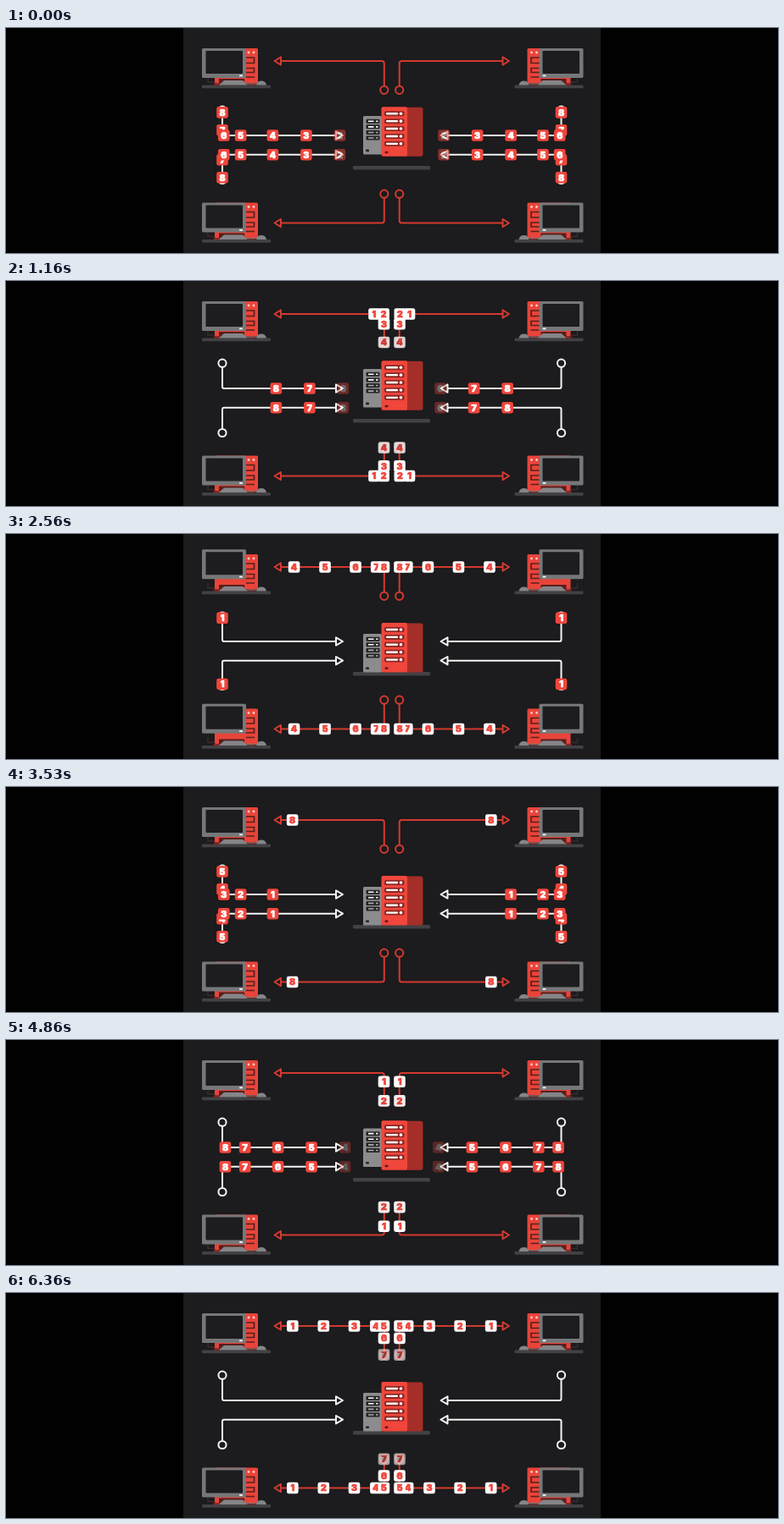
Animation of 910 by 266 pixels, one loop 6.5 s. Source, as an HTML page:

```html
<!DOCTYPE html>
<html lang="en">
<head>
<meta charset="utf-8">
<title>Client and server packets</title>
<style>
  html, body { margin: 0; width: 100%; height: 100%; overflow: hidden; background: #010102; }
  svg { display: block; width: 910px; height: 266px; }
  .packet text {
    font: 900 10.5px Inter, Roboto, "Liberation Sans", sans-serif;
    text-anchor: middle; stroke-width: .7; stroke-linejoin: round;
  }
  .request rect { fill: #f0463c; }
  .request text { fill: #fff; stroke: #fff; }
  .reply rect { fill: #fff; }
  .reply text { fill: #f0463c; stroke: #f0463c; }
  .wire { fill: none; stroke-width: 2; stroke-linejoin: round; }
</style>
</head>
<body>
<svg viewBox="0 0 910 266">
  <defs>
    <g id="tower">
      <rect x="231" y="67.5" width="81" height="3.8" rx="1" fill="#424144"/>
      <path d="M238 58v6h8" fill="none" stroke="#3c2a2b" stroke-width="1.5"/>
      <rect x="246" y="24" width="51" height="41.5" rx="1.5" fill="#e9443a"/>
      <path d="M245 65.5h8v2h-8zM285 65.5h9v2h-9z" fill="#8f2722"/>
      <circle cx="286" cy="29" r="1.4" fill="#ffc9c2"/>
      <circle cx="292" cy="29" r="1.4" fill="#ffc9c2"/>
      <path d="M280 35h12.5v6.5H280M280 47.5h12.5v5H280M283 58h10" fill="none" stroke="#56201e" stroke-width="1.7"/>
      <path d="M251 60h30v5.5h-30z" fill="#56201e"/>
      <path d="M251 67.5l6-5.5h22l6 5.5z" fill="#858588"/>
      <path d="M282 66h15" stroke="#777" fill="none"/>
      <path d="M295 67.5q1-5 6-5t6 5z" fill="#858588"/>
    </g>
    <g id="screen">
      <rect x="231" y="24" width="52" height="35" rx="1.5" fill="#767779"/>
      <rect x="235.5" y="27" width="43.5" height="27" rx="1" fill="#1d1c1f"/>
      <rect x="275" y="55.5" width="4" height="1.8" rx=".9" fill="#fff"/>
    </g>
  </defs>
  <rect x="209" width="492" height="266" fill="#1c1b1d"/>
  <g id="computers"></g>
  <g id="wires"></g>
  <rect x="409" y="163" width="91" height="4.5" rx="1.5" fill="#424144"/>
  <g id="small"></g>
  <g id="big"></g>
  <g id="packets"></g>
</svg>
<script>
const LOOP = 6500, CYCLE = 17, COUNT = 8, MIRROR_X = 909.5;
// Key points of the pace: ms, beats; one packet leaves per beat
const PACE = [[0, 0], [1160, 4.1], [4200, 16.8], [5460, 21.3], [6360, 24]];
const CORNERS = [[0, 0], [1, 0], [0, 1], [1, 1]];

const $ = id => document.getElementById(id);
const clamp = (v, a = 0, b = 1) => Math.min(b, Math.max(a, v));
const mod = (a, n) => ((a % n) + n) % n;
const easeInOut = p => (1 - Math.cos(Math.PI * clamp(p))) / 2;

function beatAt(time) {
  const t = Math.min(time, PACE[PACE.length - 1][0]);
  const i = PACE.findIndex(p => p[0] >= t) || 1;
  const [t0, b0] = PACE[i - 1], [t1, b1] = PACE[i];
  return mod(b0 + (b1 - b0) * (t - t0) / (t1 - t0), CYCLE);
}

// Distance covered when speed rises evenly over `ramp` beats, then stays
const speedUp = (x, speed, ramp) =>
  x < ramp ? speed * Math.max(x, 0) ** 2 / (2 * ramp) : speed * (x - ramp / 2);

// Each packet eases along the upright leg for two beats, then speeds up along the level one
const REQUEST = {
  name: "request", first: 9, start: -.4, from: [255, 97], leg: [0, 30], side: 1,
  speed: 39.5, ramp: 1.8, fadeIn: -.55, fadeOut: 6.4, fadeTime: .8, mirrorY: 276.7
};
const REPLY = {
  name: "reply", first: 0, start: -.1, from: [445.5, 73.3], leg: [0, -34.3], side: -1,
  speed: 36.5, ramp: 2.3, fadeIn: -.3, fadeOut: 6.5, fadeTime: .4, mirrorY: 269.5
};

function place(kind, age) {
  const x = age - kind.start;
  return [
    kind.from[0] + kind.side * speedUp(x - 2, kind.speed, kind.ramp),
    kind.from[1] + kind.leg[1] * easeInOut(x / 2)
  ];
}

const opacity = (kind, age) =>
  clamp(Math.min((age - kind.fadeIn) * 2, (kind.fadeOut - age) / kind.fadeTime));

$("computers").innerHTML = CORNERS.map(([right, low]) => {
  const flip = right ? "translate(911.5 0) scale(-1 1)" : "";
  return `<g transform="translate(0 ${low * 182.5}) ${flip}">
    <use href="#tower"/><use class="screen" href="#screen"/></g>`;
}).join("");

const wire = (color, path, cx, cy, mirrorY) => CORNERS.map(([right, low]) =>
  `<g class="wire" stroke="${color}" transform="translate(${right * MIRROR_X} ${low * mirrorY})
    scale(${right ? -1 : 1} ${low ? -1 : 1})"><path d="${path}"/>
    <circle cx="${cx}" cy="${cy}" r="4.6"/></g>`).join("");

$("wires").innerHTML =
  wire("#d23a30", "M316.5 39l7.5-4.6v9.2zM324 39H443q2.8 0 2.8 2.8V68.6", 445.8, 73.3, REPLY.mirrorY) +
  wire("#f4f4f4", "M397 127l-8-4.7v9.4zM389 127H257q-2 0-2-2V102", 255, 97.2, REQUEST.mirrorY);

const repeat = (n, make) => Array.from({ length: n }, (_, i) => make(i)).join("");

$("big").innerHTML = `
  <path d="M470 105.5h19q2.5 0 2.5 2.5v53q0 2.5-2.5 2.5h-19z" fill="#a52e28"/>
  <rect x="442.5" y="105" width="30.5" height="58.5" rx="2" fill="#f0463c"/>` +
  repeat(5, i => `<g transform="translate(0 ${113 + i * 8.9})">
    <rect x="446" y="-3" width="23.5" height="6" rx="2" fill="#8c2924"/>
    <rect x="448" y="-1.2" width="14" height="2.4" rx="1" fill="#fff"/>
    <circle cx="465.5" r="1.8" fill="#fff"/></g>`) +
  `<rect x="446.5" y="157.5" width="4" height="2.6" rx="1" fill="#5c1c19"/>`;

$("small").innerHTML = `<rect x="421" y="118" width="22" height="45.5" rx="1.5" fill="#8c8c8f"/>` +
  repeat(4, i => `<g transform="translate(0 ${124.2 + i * 6.6})">
    <rect x="424.5" y="-2.5" width="16" height="5" rx="1" fill="#252427"/>
    <path d="M427 0h6.5M436 0h2.5" stroke="${i < 2 ? "#fff" : "#aaa"}" stroke-width="1.6"/></g>`) +
  `<rect x="424" y="157.5" width="4" height="2.6" rx="1" fill="#252427"/>`;

const packets = [];
function addPacket(kind, n) {
  for (const [right, low] of CORNERS) {
    const node = document.createElementNS("http://www.w3.org/2000/svg", "g");
    node.setAttribute("class", "packet " + kind.name);
    node.innerHTML = `<rect x="-6.8" y="-6.8" width="13.6" height="13.6" rx="2.4"/><text y="3.8">${n}</text>`;
    $("packets").append(node);
    packets.push({ node, kind, n, right, low });
  }
}
// Leading requests lie on top, trailing replies lie on top
for (let n = COUNT; n; n--) addPacket(REQUEST, n);
for (let n = 1; n <= COUNT; n++) addPacket(REPLY, n);

const shift = (node, y) => node.setAttribute("transform", `translate(0 ${y.toFixed(2)})`);
const hop = (beat, peak) => Math.abs(Math.cos(Math.PI * (beat - peak)));
const screens = [...document.querySelectorAll(".screen")];

function draw(time) {
  const beat = beatAt(time);

  for (const { node, kind, n, right, low } of packets) {
    const age = mod(beat - kind.first - n + 1, CYCLE) - 1;
    const [x, y] = place(kind, age);
    node.setAttribute("transform",
      `translate(${right ? MIRROR_X - x : x} ${low ? kind.mirrorY - y : y})`);
    node.setAttribute("opacity", opacity(kind, age));
  }

  const serving = beat < 6.47 || beat > 15.47;
  shift($("big"), serving ? -11.8 * hop(beat, -.03) : 0);
  shift($("small"), serving ? -14 * Math.sqrt(hop(beat, .05)) : 0);
  const receiving = beat > 7.7 && beat < 13.7;
  screens.forEach(s => shift(s, receiving ? -8 * hop(beat, .2) : 0));
}

const start = performance.now();
function loop() {
  draw((performance.now() - start) % LOOP);
  requestAnimationFrame(loop);
}
loop();
</script>
</body>
</html>
```
